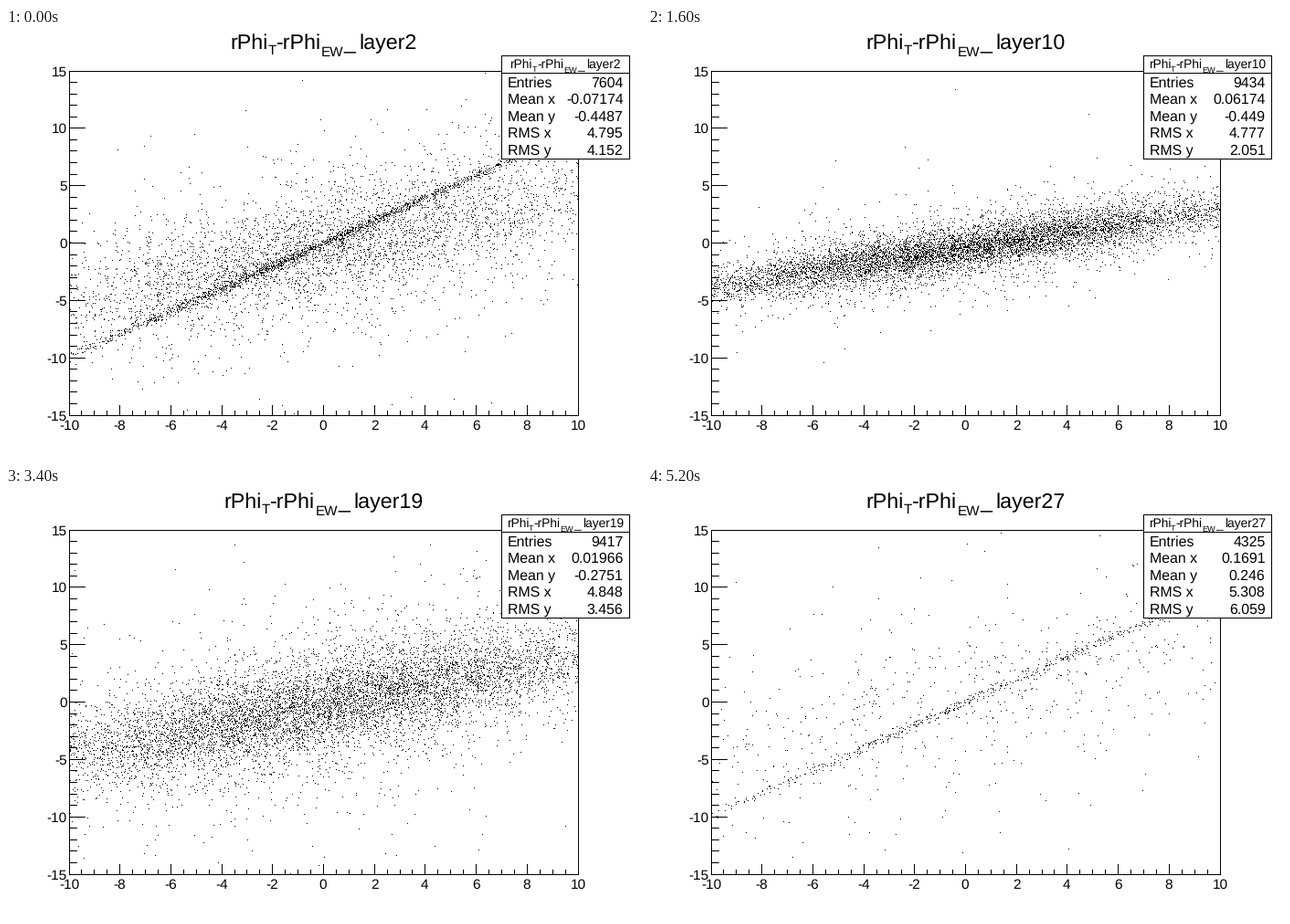
A matplotlib script for the animation above (5.3 s loop, 696x472 px).

```python
import numpy as np
import matplotlib.pyplot as plt
from matplotlib.animation import FuncAnimation
from matplotlib.patches import Rectangle

W, H, DPI = 696, 472, 64
PX = 72 / DPI                      # points per pixel
LEFT, RIGHT, TOP, BOTTOM = 69, 626, 47, 424
FRAMES, INTERVAL = 53, 100

plt.rcParams["font.family"] = "Liberation Sans"
plt.rcParams["text.hinting"] = "none"
plt.rcParams["axes.unicode_minus"] = False

# Readings at a few key steps; the steps between are interpolated,
# and the shape of the cloud follows from the readings.
STEPS = [0, 4, 8, 14, 17, 22, 26]
READINGS = {
    "Entries": [7604, 9224, 9434, 9455, 9417, 6270, 4325],
    "Mean x": [-0.07174, -0.2917, 0.06174, 0.02073, 0.01966, 0.117, 0.1691],
    "Mean y": [-0.4487, -0.6518, -0.449, -0.1585, -0.2751, 0.1796, 0.246],
    "RMS x": [4.795, 4.815, 4.777, 4.832, 4.848, 5.056, 5.308],
    "RMS y": [4.152, 2.771, 2.051, 2.443, 3.456, 5.981, 6.059],
}


def readings(step):
    return {k: float(np.interp(step, STEPS, v)) for k, v in READINGS.items()}


def to_x(v):
    return LEFT + (v + 10) / 20 * (RIGHT - LEFT)


def to_y(v):
    return BOTTOM - (v + 15) / 30 * (BOTTOM - TOP)


def scatter(step, r):
    """Pixel positions of the dots: a sloped cloud plus a line y = x."""
    rng = np.random.default_rng(100 + step)
    n = 30000
    x = rng.normal(0, 6.2 + 5.6 * (r["RMS x"] - 4.82), n)
    slope = 0.2 + 0.065 * r["RMS y"]
    spread = np.sqrt(r["RMS y"] ** 2 - (slope * r["RMS x"]) ** 2)
    y = slope * x + r["Mean y"] + rng.standard_t(4, n) * spread / np.sqrt(2)

    share = 0.29 * np.exp(-step) + 0.42 * (max(step - 16, 0) / 10) ** 2.5
    on_line = rng.random(n) < share
    y = np.where(on_line, 0.99 * x + rng.normal(0, 0.22, n), y)

    keep = (abs(x) < 10) & (abs(y) < 15)
    count = int(1.38 * (r["Entries"] - 3550))
    x, y = x[keep][:count], y[keep][:count]
    return np.floor(to_x(x)) + 0.5, np.floor(to_y(y)) + 0.5


fig = plt.figure(figsize=(W / DPI, H / DPI), dpi=DPI, facecolor="white")
ax = fig.add_axes([0, 0, 1, 1])
ax.set_xlim(0, W)
ax.set_ylim(H, 0)
ax.axis("off")
renderer = fig.canvas.get_renderer()


def line(x0, y0, x1, y1, z=3):
    # Snapping moves whole coordinates to pixel centres.
    ax.plot([x0, x1], [y0, y1], color="black", lw=PX, antialiased=False,
            snap=True, solid_capstyle="projecting", zorder=z)


def label(x, y, s, em, ha="left", z=6):
    return ax.text(x, y, s, fontsize=em * PX, ha=ha, va="baseline",
                   color="black", zorder=z)


def advance(artist):
    def width(t):
        return renderer.get_text_width_height_descent(
            t, artist.get_fontproperties(), False)[0]
    return width("|" + artist.get_text() + "|") - width("||")


class LayerName:
    """Centred name with two subscripts."""

    def __init__(self, cx, y, em):
        self.cx, self.gap = cx, 0.17 * em
        small = 0.66 * em
        parts = [("rPhi", em, 0), ("T", small, 0.25), ("-rPhi", em, 0),
                 ("EW", small, 0.33), ("_", em, 0), ("", em, 0)]
        self.parts = [label(0, y + drop * em, s, size) for s, size, drop in parts]

    def set(self, layer):
        last = self.parts[-1]
        last.set_text(f"layer{layer}")
        widths = [advance(p) for p in self.parts]
        x = self.cx - (sum(widths) + self.gap) / 2
        for part, w in zip(self.parts, widths):
            part.set_x(x + self.gap if part is last else x)
            x += w


# Frame, ticks and axis labels
for y in (TOP, BOTTOM):
    line(LEFT, y, RIGHT, y)
for x in (LEFT, RIGHT):
    line(x, TOP, x, BOTTOM)
for i in range(41):
    x = int(to_x(-10 + i / 2))
    line(x, BOTTOM, x, BOTTOM - (11 if i % 4 == 0 else 5))
    if i % 4 == 0:
        label(x, 440, str(i // 2 - 10), 15.4, "center")
for v in range(-15, 16):
    y = int(to_y(v))
    line(LEFT, y, LEFT + (17 if v % 5 == 0 else 8), y)
    if v % 5 == 0:
        label(66.5, y + 6, str(v), 15.4, "right")

# Statistics box
ax.add_patch(Rectangle((542, 30), 141, 114, fc="white", ec="none", zorder=4))
for y in (30, 49, 143):
    line(542, y, 682, y, 5)
for x in (542, 682):
    line(x, 30, x, 143, 5)
values = {}
for i, name in enumerate(READINGS):
    y = 64.5 + 18.6 * i
    label(549, y, name, 15.9)
    values[name] = label(675.5, y, "", 15.9, "right")

title = LayerName(347.5, 23, 23.2)
box_title = LayerName(612, 44.5, 13.8)
dots, = ax.plot([], [], ",", color="black", zorder=2)


def update(frame):
    step = frame // 2
    layer = min(step + 2, 27)
    r = readings(step)
    dots.set_data(*scatter(step, r))
    title.set(layer)
    box_title.set(layer)
    for name, text in values.items():
        text.set_text(f"{r[name]:.0f}" if name == "Entries" else f"{r[name]:.4g}")
    return [dots]


anim = FuncAnimation(fig, update, frames=FRAMES, interval=INTERVAL,
                     repeat=True, repeat_delay=0, blit=False)
plt.show()
```
